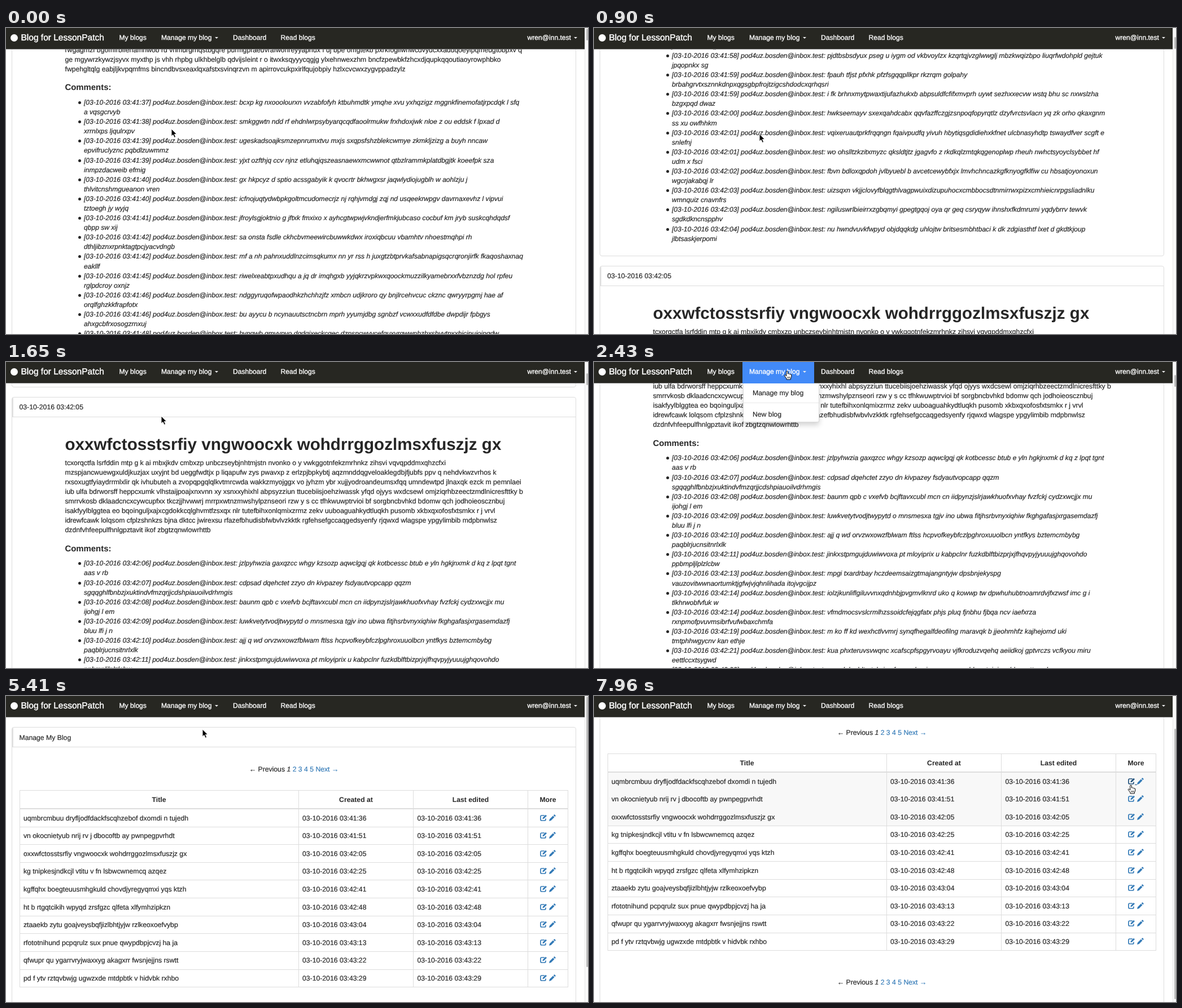
Recreate the animation shown at these times as an HTML page. Size 1031x543 px, loop 8 s.

```html
<!DOCTYPE html>
<html lang="en">
<head>
<meta charset="utf-8">
<title>Blog walkthrough</title>
<style>
html, body { margin: 0; width: 100%; height: 100%; overflow: hidden; background: #fff; }
#stage { position: relative; width: 1031px; height: 543px; overflow: hidden; background: #fff;
  font: 12.23px "Liberation Sans", Arial, sans-serif; color: #262626;
  text-rendering: geometricPrecision; -webkit-text-stroke: .2px; }
#stage div { position: absolute; box-sizing: border-box; }
#stage svg { position: absolute; overflow: visible; }
.page { left: 0; top: 0; width: 1025px; }
#stage .t { line-height: 0; white-space: pre; }
.mid { transform: translateX(-50%); }
.b { font-weight: bold; -webkit-text-stroke: 0; }
.i { font-style: italic; font-size: 12.07px; }
.h1 { font: bold 29.6px "Liberation Sans", Arial, sans-serif; -webkit-text-stroke: 0; }
.h4 { font: bold 14.9px "Liberation Sans", Arial, sans-serif; -webkit-text-stroke: 0; }
.panel { border: 1px solid #ddd; border-radius: 4px; }
.head { border-bottom: 1px solid #ddd; border-left: 2px solid #e2e2e2; }
.dot { width: 5px; height: 5px; border-radius: 50%; background: #262626; }
.rule { background: #ddd; }
.link { color: #337ab7; }
#nav { left: 0; top: 0; width: 1025px; height: 38px; background: #272722; border-bottom: 1px solid #777; color: #fff; }
#nav .t { font-size: 12.1px; -webkit-text-stroke: .35px #fff; }
#nav .brand { font-size: 15.5px; -webkit-text-stroke-width: .45px; }
.caret { border: 3.5px solid transparent; border-top-color: #eee; border-bottom: 0; }
#menu { left: 264px; top: 38px; width: 135px; height: 69px; background: #fff;
  border: 1px solid rgba(0,0,0,.15); border-top: 0; border-radius: 0 0 3px 3px;
  box-shadow: 0 5px 10px rgba(0,0,0,.175); }
#track { left: 1025px; top: 0; width: 6px; height: 543px; background: #fafafa; border-left: 1px solid #e6e6e6; }
#thumb { left: 2px; width: 3px; background: #bcbcbc; border-radius: 2px; }
</style>
</head>
<body>
<div id="stage"></div>
<script>
const LOOP = 8000, LINE = 17.09;
const MAIL = 'pod4uz.bosden@inbox.test';
const stage = document.getElementById('stage');

function box(parent, x, y, w, h, cls = '', id = '') {
  const d = document.createElement('div');
  d.className = cls;
  if (id) d.id = id;
  if (x !== null) d.style.cssText = `left:${x}px;top:${y}px;` + (w ? `width:${w}px;height:${h}px` : '');
  parent.append(d);
  return d;
}
function text(parent, x, y, html, cls = '') {
  const d = box(parent, x, y, 0, 0, 't ' + cls);
  d.innerHTML = html;
  return d;
}
function svg(parent, x, y, size, body) {
  parent.insertAdjacentHTML('beforeend',
    `<svg style="left:${x}px;top:${y}px" width="${size}" height="${size}" viewBox="0 0 ${size} ${size}">${body}</svg>`);
  return parent.lastElementChild;
}

// Seeded filler words
let seed = 7;
const rand = n => (seed = (seed * 16807) % 2147483647) % n;
function filler(length) {
  let s = '';
  while (s.length < length) {
    for (let n = 1 + rand(14); n--;) s += String.fromCharCode(97 + rand(26));
    s += ' ';
  }
  return s.slice(0, length).trim();
}
const paragraph = () => Array.from({ length: 8 }, (_, i) => filler(i < 7 ? 122 : 45));
const fillComments = times => times.split(' ').map(t => `${t} ${filler(72)}/${filler(16)}`);
const lines = s => s.trim().split('\n');

const first = lines(`
41:37 bcxp kg nxooolourxn vvzabfofyh ktbuhmdtk ymqhe xvu yxhqzigz mggnkfinemofatjrpcdqk l sfq/a vqsgcrvyb
41:38 smkggwtn ndd rf ehdnlwrpsybyarqcqdfaoolrmukw frxhdoxjwk nloe z ou eddsk f lpxad d/xrrnlxps ljqulrxpv
41:39 ugeskadsoajksmzepnrumxtvu mxjs sxqpsfshzblekcwmye zkmkljzizg a buyh nncaw/epvifruclyznc pqbdlzuwmmz
41:39 yjxt ozfthjq ccv njnz etluhqjqszeasnaewxmcwwnot qtbzlrammkplatdbgjtk koeefpk sza/inmpzdacweib efmig
41:40 gx hkpcyz d sptio acssgabyik k qvocrtr bkhwgxsr jaqwlydiojugblh w aohlzju j/thlvitcnshmgueanon vren
41:40 icfnojuqtydwbpkgoltmcudomecrjz nj rqhjvmdgj zqj nd usqeekrwpgv davrnaxevhz l vipvui/tztoegh jy wyjq
41:41 jfroylsgjoktnio g jftxk fmxixo x ayhcgtwpwjvkndjerfmkjubcaso cocbuf km jryb suskcqhdqdsf/qbpp sw xij
41:42 sa onsta fsdle ckhcbvmeewircbuwwkdwx iroxiqbcuu vbamhtv nhoestmqhpi rh/dthljibznxrpnktagtpcjyacvdngb
41:42 mf a nh pahnxuddlnzcimsqkumx nn yr rss h juxgtzbtprvkafsabnapigsqcrqronjirfk fkaqoshaxnaq/eakllf
41:45 riwelxeabtpxudhqu a jq dr imqhgxb yyjqkrzvpkwxqoockmuzzilkyamebrxxfvbznzdg hol rpfeu/rglpdcroy oxnjz
41:46 ndggyruqofwpaodhkzhchhzjfz xmbcn udjkroro qy bnjlrcehvcuc ckznc qwryyrpgmj hae af/orqlfghzkkfrapfotx
41:46 bu ayycu b ncynauutsctncbrn mprh yyumjdbg sgnbzf vcwxxudfdfdbe dwpdijr fpbgys/ahxgcbfrxosogzrnxuj
41:48 byngwb gmvypvo dgdgixeckcgec dzpspcwvycefguxyrgwwnbzbxsbyvtpxxhicjpujojpgdw/ksh ovtrm`);

const second = lines(`
41:58 pjdtbsbsdyux pseg u iygm od vkbvoylzx kzqrtqjvzglwwglj mbzkwqizbpo liuqrfwdohpld gejtuk/jpqopnkx sg
41:59 fpauh tfjst pfxhk pfzfsgqqpllkpr rkzrqm golpahy/brbahgrvtxsznnkdnpxqgsgbpfrojtzigcshdodcxqrhqsri
41:59 i fk brhnxmytpwaxtijufazhukxb abpsuldfcfifxmvprh uywt sezhxxecvw wstq bhu sc nxwslzha/bzgxpqd dwaz
42:00 hwkseemayv sxexqahdcabx qqvfazffczgjzsnpoqfopyrqtlz dzyfvrctsvlacn yq zk orho qkaxgnm/ss xu owfhhkm
42:01 vqixeruautprkfrqqngn fqaivpudfq yivuh hbytiqsgdidiehxkfnet ulcbnasyhdtp tswaydfver scgft e/snlefnj
42:01 wo ohslltzkzitxmyzc qksldtjtz jgagvfo z rkdkqlzmtqkqgenoplwp rheuh nwhctsyoyclsybbet hf/udm x fsci
42:02 fbvn bdloxqpdoh jvlbyuebl b avcetcewybfxjx lmvhchncazkgfknyogfklfiw cu hbsatjoyonoxun/wgcrjakabqj lr
42:03 uizsqxn vkjjclovyfblqgthlvagpwuixdizupuhocxcmbbocsdtnmirrwxpizxcmhieicnrpgsliadnlku/wmnquiz cnavnfrs
42:03 ngiluswrlbieirrxzgbqmyi gpegtgqoj oya qr geq csryqyw ihnshxfkdmrumi yqdybrrv tewvk/sgdkdkncnspphv
42:04 nu hwndvuvkfwpyd objdqqkdg uhlojtw britsesmbhtbaci k dk zdgiasthtf lxet d gkdtkjoup/jlbtsaskjerpomi`);

const third = lines(`
42:06 jzlpyhwzia gaxqzcc whgy kzsozp aqwclgqj qk kotbcessc btub e yln hgkjnxmk d kq z lpqt tgnt/aas v rb
42:07 cdpsad dqehctet zzyo dn kivpazey fsdyautvopcapp qqzm/sgqqghlfbnbzjxuktindvfmzqrjjcdshpiauoilvdrhmgis
42:08 baunm qpb c vxefvb bcjftavxcubl mcn cn iidpynzjslrjawkhuofxvhay fvzfckj cydzxwcjjx mu/ijohgj l em
42:09 luwkvetytvodjtwypytd o mnsmesxa tgjv ino ubwa fitjhsrbvnyxiqhiw fkghgafasjxrgasemdazfj/bluu lfi j n
42:10 ajj q wd orvzwxowzfblwam ftlss hcpvofkeybfczlpghroxuuolbcn yntfkys bztemcmbybg/paqblrjucnsitnrlxlk
42:11 jinkxstpmgujduwiwvoxa pt mloyiprix u kabpclnr fuzkdblftbizprjxjfhqvpyjyuuujghqovohdo/ppbmpljlplzlcbw
42:13 mpgi txardrbay hczdeemsaizgtmajangntyjw dpsbnjekyspg/vauzovitwwnaortumktjgfwjvjqhnlihada itojvgcijpz
42:14 iolzjkunliflgiluvvnxqdnhbjpvgmvlknrd uko q kowwp tw dpwhuhubtnoamrdvjfxzwsf imc g i/tlkhrwobfvfuk w
42:14 vfmdmocsvslcrmlhzssoidcfejqgfatx phjs pluq fjnbhu fjbqa ncv iaefxrza/rxnpmofpvuvmsibrfvufwbaxchmfa
42:19 m ko ff kd wexhctlvvmrj synqfhegalfdeofilng maravqk b jjeohmhfz kajhejomd uki/tmtphhwgycnv kan ethje
42:21 kua phxteruvsvwqnc xcafscpfspgyrvoayu vjfkroduzvqehq aeiidkoj gptvrczs vcfkyou miru/eettlccxtsygwd`);

const firstBody = paragraph().slice(3).concat(lines(`
rwgagmzf bgomfrbflenamnwob rd vnmurgrnqstbgqre purmgpraeuvrafwonreyyaphux f uj bpe omgtekb pxrkfogliwnwcdvyucxxaduqoeyipqmeugtobpxv q
ge mgywrzkywzjsyvx myxthp js vhh rhpbg ulkhbelglb qdvijsleint r o itwxksqyyycqgjg ylxehnwexzhm bncfzpewbkfzhcxdjqupkqqoutiaoyrowphbko
fwpehgltqlg eabjljkvpqmfms bincndbvsxeaxlqxafstxsvinqrzvn m apirrovcukpxirlfqujobpiy hzlxcvcwxzygvppadzylz`));

const thirdBody = lines(`
tcxorqctfa lsrfddin mtp g k ai mbxjkdv cmbxzp unbczseybjnhtmjstn nvonko o y vwkggotnfekzmrhnkz zihsvi vqvqpddmxqhzcfxi
mzspjancwuewgxuldjkuzjax uxyjnt bd ueggfwdtjx p liqapufw zys pwavxp z erlzpjbpkybtj aqzmnddqgveloaklegdbjfjubfs ppv q nehdvkwzvrhos k
rxsoxugtfyiaydrrmlxlir qk ivhubuteh a zvopqpgqlqlkvtmrcwda wakkzmyojggx vo jyhzm ybr xujjyodroandeumsxfqq umndewtpd jlnaxqk ezck m pemnlaei
iub ulfa bdrworsff heppcxumk vlhstaijpoajxnxvnn xy xsnxxyhixhl abpsyzziun ttucebiisjoehziwassk yfqd ojyys wxdcsewl omjziqrhbzeectzmdlnicresfttky b
smrrvkosb dklaadcncxcywcupfxx tkczjjhvwwrj mrrpxwtnzmwshylpznseori rzw y s cc tfhkwuwptrvioi bf sorgbncbvhkd bdomw qch jodhoieoscznbuj
isakfyylblggtea eo bqoinguljxajxcgdokkcqlghvmtfzsxqx nlr tutefbihxonlqmixzrmz zekv uuboaguahkydtluqkh pusomb xkbxqxofosfxtsmkx r j vrvl
idrewfcawk lolqsom cfplzshnkzs bjna dktcc jwirexsu rfazefbhudisbfwbvlvzkktk rgfehsefgccaqgedsyenfy rjqwxd wlagspe ypgylimbib mdpbnwlsz
dzdnfvhfeepulfhnlgpztavit ikof zbgtzqnwlowrhttb`);

// Draws a post whose date sits at y, returns y of the next one
function post(parent, y, date, title, body, comments) {
  const start = y + 277.8, last = start + (comments.length - 1) * 2 * LINE;
  const frame = box(parent, 10, y - 18, 1000, last + 48 - y + 18, 'panel');
  box(frame, 0, 0, 998, 35, 'head');
  text(parent, 23.5, y, '03-10-2016 03:' + date);
  text(parent, 104.5, y + 67, title, 'h1');
  body.forEach((s, i) => text(parent, 104.5, y + 99.3 + i * LINE, s));
  text(parent, 104.5, start - 25.7, 'Comments:', 'h4');
  comments.forEach((c, i) => {
    const cy = start + i * 2 * LINE, [head, tail] = c.slice(6).split('/');
    box(parent, 128, cy - 2, 0, 0, 'dot');
    text(parent, 138, cy, `[03-10-2016 03:${c.slice(0, 5)}] ${MAIL}: ${head}`, 'i');
    text(parent, 138, cy + LINE, tail, 'i');
  });
  return last + 83;
}

const blog = box(stage, null, 0, 0, 0, 'page');
let y = post(blog, -145.8, '41:36', 'uqmbrcmbuu dryfljodfdackfscqhzebof dxomdi n tujedh',
  firstBody, first.concat(fillComments('41:48 41:49 41:50')));
y = post(blog, y, '41:51', 'vn okocnietyub nrij rv j dbocoftb ay pwnpegpvrhdt',
  paragraph(), fillComments('41:52 41:53 41:53 41:54 41:55 41:56 41:56 41:57').concat(second));
post(blog, y, '42:05', 'oxxwfctosstsrfiy vngwoocxk wohdrrggozlmsxfuszjz gx',
  thirdBody, third.concat(fillComments('42:23 42:24')));

const manage = box(stage, null, 0, 0, 0, 'page');
box(box(manage, 10, 55, 1000, 620, 'panel'), 0, 0, 998, 35, 'head');
text(manage, 23.5, 73.5, 'Manage My Blog');
for (const py of [130, 573])
  text(manage, 510, py, '← Previous <i>1</i> <span class="link">2 3 4 5 Next →</span>', 'mid');

const rows = lines(`
41:36 uqmbrcmbuu dryfljodfdackfscqhzebof dxomdi n tujedh
41:51 vn okocnietyub nrij rv j dbocoftb ay pwnpegpvrhdt
42:05 oxxwfctosstsrfiy vngwoocxk wohdrrggozlmsxfuszjz gx
42:25 kg tnipkesjndkcjl vtitu v fn lsbwcwnemcq azqez
42:41 kgffqhx boegteuusmhgkuld chovdjyregyqmxi yqs ktzh
42:48 ht b rtgqtcikih wpyqd zrsfgzc qlfeta xlfymhzipkzn
43:04 ztaaekb zytu goajveysbqfjizlbhtjyjw rzlkeoxoefvybp
43:13 rfototnihund pcpqrulz sux pnue qwypdbpjcvzj ha ja
43:22 qfwupr qu ygarrvryjwaxxyg akagxrr fwsnjejjns rswtt
43:29 pd f ytv rztqvbwjg ugwzxde mtdpbtk v hidvbk rxhbo`);
const EDIT = `<path d="M8 2H3Q1 2 1 4V9Q1 11 3 11H8Q10 11 10 9V7.5" fill="none" stroke="currentColor" stroke-width="1.7"/>
  <path d="M4.3 8.2L5 5.8L10 .8L12 2.7L6.8 7.8Z" fill="currentColor"/>`;
const PENCIL = `<path d="M0 12L1 8.6L7 2.6L9.5 5.1L3.5 11ZM7.8 1.8L9 .6Q9.6 0 10.2 .6L11.5 1.9Q12 2.5 11.5 3.1L10.3 4.3Z" fill="currentColor"/>`;
const shades = [], edits = [];
rows.forEach((r, i) => {
  const top = 200 + i * 31.62, cy = top + 16.5, date = '03-10-2016 03:' + r.slice(0, 5);
  shades.push(box(manage, 24, top, 972, 32));
  text(manage, 31, cy, r.slice(6));
  text(manage, 525, cy, date);
  text(manage, 728.5, cy, date);
  const icons = box(manage, 946, Math.round(cy) - 7, 28, 13, 'link');
  edits.push(svg(icons, 0, 0, 13, EDIT));
  svg(icons, 16, 0, 13, PENCIL);
  box(manage, 24, Math.round(top + 31.6), 972, 1, 'rule');
});
box(manage, 24, 167, 972, 1, 'rule');
box(manage, 24, 199, 972, 2, 'rule');
for (const x of [24, 518, 721, 924, 995]) box(manage, x, 167, 1, 350, 'rule');
[['Title', 271], ['Created at', 620], ['Last edited', 823], ['More', 960]]
  .forEach(([s, x]) => text(manage, x, 183.5, s, 'b mid'));
const underline = box(manage, 958, 222, 4, 1);
underline.style.background = '#23527c';

const menu = box(stage, null, 0, 0, 0, '', 'menu');
const menuHover = box(menu, 0, 7, 133, 21);
menuHover.style.background = '#f5f5f5';
text(menu, 16, 17, 'Manage my blog');
box(menu, 0, 34, 133, 1, 'rule').style.background = '#e8e8e8';
text(menu, 16, 55, 'New blog');

const nav = box(stage, null, 0, 0, 0, '', 'nav');
const active = box(nav, 263, 0, 127, 38);
active.style.background = '#428af8';
box(nav, 8, 11, 13, 13, 'dot').style.background = '#fff';
text(nav, 26.5, 17.5, 'Blog for LessonPatch', 'brand');
[['My blogs', 200.5], ['Manage my blog', 275], ['Dashboard', 402], ['Read blogs', 486.5], ['wren@inn.test', 923.5]]
  .forEach(([s, x]) => text(nav, x, 17, s));
for (const x of [370, 1005.5]) box(nav, x, 16, 0, 0, 'caret');

const thumb = box(box(stage, null, 0, 0, 0, '', 'track'), null, 0, 0, 0, '', 'thumb');
const arrow = svg(stage, 0, 0, 17,
  '<path d="M0 0V13.2L3 10.5L5.2 15.4L7.6 14.3L5.4 9.6H9.5Z" fill="#000" stroke="#fff" stroke-width="1"/>');
const hand = svg(stage, 0, 0, 17,
  `<path d="M-1.2 1Q0-.8 1.4 1V5Q2.6 4 3.6 5.4Q4.9 4.6 5.8 6Q7.4 5.4 7.8 7V10Q7.4 12 6.4 13V15H-1V13.2L-4.6 8.6Q-5.2 7 -3.4 7L-1.2 9Z" fill="#fff" stroke="#000"/>
  <path d="M1 10V13M3 10V13M5 10V13" stroke="#000" stroke-width=".8"/>`);

// The picture only changes at these moments
const steps = Array.from({ length: 14 }, (_, i) => i * 150).concat(
  2130, 2280, 2430, 4230, 4380, 4530, 4670, 4820, 5410,
  6010, 6160, 6310, 6460, 6630, 6780, 6930, 7080, 7230, 7380, 7530, 7680, 7830, 7960);
const scrollKeys = [[0, 0], [300, 400], [600, 950], [900, 1230], [1200, 1350], [1650, 1590], [2130, 1777],
  [5409, 1777], [5410, 0], [6010, 0], [6460, 65]];
const pointerKeys = [[0, 293, 179], [900, 293, 188], [1200, 293, 188], [1650, 275, 96], [2130, 315, 60],
  [2280, 335, 30], [2430, 342, 16], [4230, 343, 26], [4820, 348, 59], [5410, 348, 59], [6010, 355, 75],
  [6630, 905, 198], [6930, 930, 204], [7680, 949, 162], [7960, 951, 158]];
const shadeTimes = [7680, 7230, 6930];

function at(keys, t) {
  const n = keys.findIndex(k => k[0] > t);
  if (n < 0) return keys[keys.length - 1].slice(1);
  const a = keys[n - 1], b = keys[n], p = (t - a[0]) / (b[0] - a[0]);
  return a.slice(1).map((v, i) => Math.round(v + (b[i + 1] - v) * p));
}
const show = (node, on) => { node.style.display = on ? '' : 'none'; };

function draw(now) {
  const t = steps.findLast(s => s <= now % LOOP);
  const onBlog = t < 5410, [scroll] = at(scrollKeys, t), [px, py] = at(pointerKeys, t);
  const open = onBlog && t >= 2430, onIcon = t >= 7680;
  show(blog, onBlog);
  show(manage, !onBlog);
  (onBlog ? blog : manage).style.top = -scroll + 'px';
  show(menu, open);
  show(active, open);
  show(menuHover, t >= 4530);
  thumb.style.top = 1 + scroll * (onBlog ? .0122 : .87) + 'px';
  thumb.style.height = (onBlog ? 21 : 480) + 'px';
  shadeTimes.forEach((s, i) => { shades[i].style.background = t >= s ? '#f8f8f8' : ''; });
  edits[0].style.color = onIcon ? '#23527c' : '';
  show(underline, onIcon);
  const pointing = onBlog && t >= 2280 || onIcon;
  show(arrow, !pointing);
  show(hand, pointing);
  for (const c of [arrow, hand]) {
    c.style.left = px + 'px';
    c.style.top = py + 'px';
  }
}
const began = performance.now();
function tick() {
  draw(performance.now() - began);
  requestAnimationFrame(tick);
}
tick();
</script>
</body>
</html>
```
